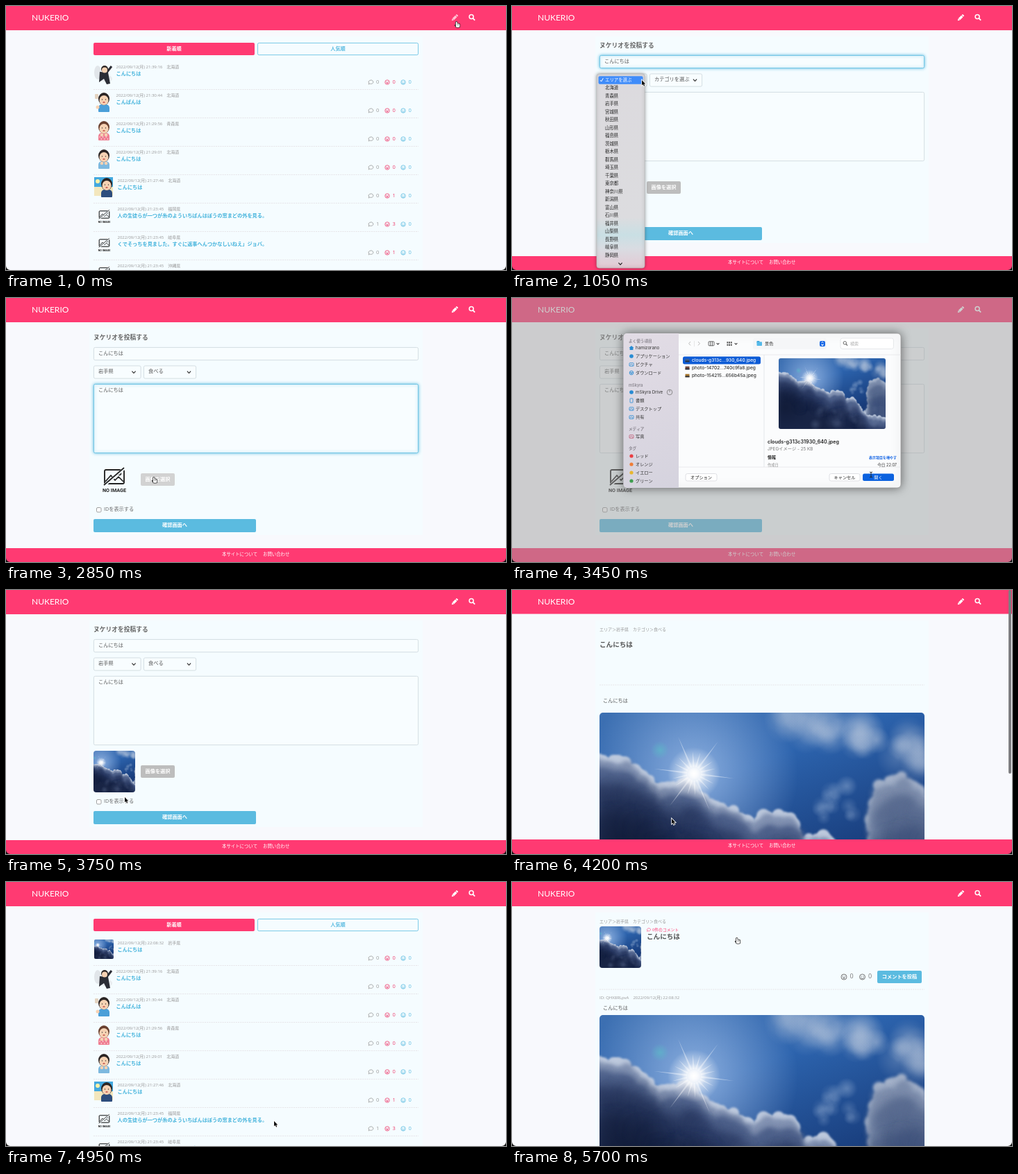
An HTML page with a canvas for the animation above (5.85 s loop, 720 by 381 pixels).

```html
<!DOCTYPE html>
<html lang="ja">
<head>
<meta charset="utf-8">
<style>
html, body { margin: 0; width: 100%; height: 100%; overflow: hidden; background: #f8f9fd; }
canvas { display: block; width: 720px; height: 381px; }
</style>
</head>
<body>
<canvas id="stage" width="720" height="381"></canvas>
<script>
const ctx = document.getElementById('stage').getContext('2d');
const W = 720, H = 381, STEP = 150, LOOP = 5850;
const PINK = '#ff3a72', BLUE = '#5bbbe0', GREY = '#999', INK = '#666', LINE = '#ccd6db', PAGE = '#f5fcff';
const WEB = '"Open Sans", "Noto Sans CJK JP", sans-serif';
const MAC = 'Inter, "Noto Sans CJK JP", sans-serif';
const WORD = 'こんにちは';
const AREAS = ('エリアを選ぶ 北海道 青森県 岩手県 宮城県 秋田県 山形県 福島県 茨城県 栃木県 群馬県 埼玉県 ' +
  '千葉県 東京都 神奈川県 新潟県 富山県 石川県 福井県 山梨県 長野県 岐阜県 静岡県').split(' ');
const CATEGORIES = 'カテゴリを選ぶ 食べる 遊ぶ 見る 買う その他'.split(' ');

function text(s, x, y, size, color = INK, { weight = 400, align = 'left', font = WEB } = {}) {
  ctx.font = `${weight} ${size}px ${font}`;
  ctx.textAlign = align;
  ctx.textBaseline = 'middle';
  ctx.fillStyle = color;
  ctx.fillText(s, x, y);
}
function box(x, y, w, h, r, fill, stroke) {
  ctx.beginPath();
  ctx.roundRect(x, y, w, h, r);
  if (fill) { ctx.fillStyle = fill; ctx.fill(); }
  if (stroke) { ctx.strokeStyle = stroke; ctx.lineWidth = 0.8; ctx.stroke(); }
}
function disc(x, y, r, fill, ry = r) {
  ctx.beginPath();
  ctx.ellipse(x, y, r, ry, 0, 0, 7);
  ctx.fillStyle = fill;
  ctx.fill();
}
function ring(x, y, r, color, width = 0.9) {
  ctx.beginPath();
  ctx.arc(x, y, r, 0, 7);
  ctx.strokeStyle = color;
  ctx.lineWidth = width;
  ctx.stroke();
}
function stroke(points, color, width = 1) {
  ctx.beginPath();
  points.forEach(([x, y]) => ctx.lineTo(x, y));
  ctx.strokeStyle = color;
  ctx.lineWidth = width;
  ctx.stroke();
}
function shape(points, fill, outline) {
  ctx.beginPath();
  points.forEach(([x, y]) => ctx.lineTo(x, y));
  ctx.closePath();
  if (outline) { ctx.strokeStyle = outline; ctx.lineWidth = 1.6; ctx.stroke(); }
  ctx.fillStyle = fill;
  ctx.fill();
}
function at(x, y, scale, draw) {
  ctx.save();
  ctx.translate(x, y);
  ctx.scale(scale, scale);
  draw();
  ctx.restore();
}
function divider(y) {
  ctx.setLineDash([2, 1.2]);
  stroke([[126, y], [594, y]], '#e3dfe3', 0.8);
  ctx.setLineDash([]);
}
const chevron = (x, y, color = '#333', s = 1) =>
  stroke([[x - 2.6 * s, y - 1.3 * s], [x, y + 1.4 * s], [x + 2.6 * s, y - 1.3 * s]], color, 1.2);
function button(label, x, y, w, h, fill) {
  box(x, y, w, h, 2, fill);
  text(label, x + w / 2, y + h / 2, 7.2, '#fff', { weight: 700, align: 'center' });
}

// Sky photo, painted once
function paintSky() {
  const canvas = document.createElement('canvas');
  canvas.width = 468; canvas.height = 311;
  const c = canvas.getContext('2d');
  let seed = 11;
  const random = () => (seed = (seed * 16807) % 2147483647) / 2147483647;
  const sky = c.createLinearGradient(0, 0, 120, 311);
  sky.addColorStop(0, '#3d70b2');
  sky.addColorStop(0.45, '#2c63ad');
  sky.addColorStop(1, '#173a78');
  c.fillStyle = sky;
  c.fillRect(0, 0, 468, 311);
  const glow = (x, y, r, rgb, alpha) => {
    const g = c.createRadialGradient(x, y, 0, x, y, r);
    g.addColorStop(0, `rgba(${rgb},${alpha})`);
    g.addColorStop(1, `rgba(${rgb},0)`);
    c.fillStyle = g;
    c.fillRect(x - r, y - r, 2 * r, 2 * r);
  };
  const bank = (ridge, layers) => layers.forEach(([shift, color, blur]) => {
    c.filter = `blur(${blur}px)`;
    c.fillStyle = color;
    c.beginPath();
    c.moveTo(ridge[0][0], 340);
    ridge.forEach(([x, y]) => c.lineTo(x + shift * 0.2, y + shift));
    c.lineTo(ridge[ridge.length - 1][0], 340);
    c.fill();
    ridge.slice(1).forEach(([x, y], i) => {
      const [px, py] = ridge[i];
      for (let f = 0; f < 1; f += 0.2) {
        c.beginPath();
        c.arc(px + (x - px) * f + shift * 0.2 + random() * 6 - 3,
          py + (y - py) * f + shift + random() * 6, 4 + random() * 7, 0, 7);
        c.fill();
      }
    });
    c.filter = 'none';
  });
  for (let i = 0; i < 45; i++) {
    const f = random();
    glow(265 + f * 205, 4 + f * 55 + (random() - 0.5) * 38, 14 + random() * 22, '190,203,222', 0.25);
  }
  for (let i = 0; i < 14; i++) glow(310 + random() * 60, 105 + random() * 60, 6 + random() * 12, '165,188,220', 0.25);
  glow(136, 88, 150, '190,215,250', 0.65);
  bank([[380, 300], [376, 245], [402, 200], [394, 150], [400, 102], [435, 92], [480, 128]],
    [[0, '#a3b1c9', 2], [12, '#7b8cab', 4], [34, '#596b90', 7], [80, '#41547d', 10]]);
  bank([[-12, 62], [38, 70], [70, 95], [75, 130], [82, 108], [125, 98], [150, 124], [195, 140], [222, 163],
    [238, 146], [274, 147], [290, 184], [325, 174], [345, 207], [380, 248], [480, 262]],
    [[0, '#bdc9dd', 1.5], [9, '#8292b2', 3], [22, '#4d608a', 5], [48, '#2d3d66', 8], [92, '#1b284b', 12]]);
  glow(30, 215, 130, '15,25,52', 0.75);
  glow(180, 300, 110, '20,30,58', 0.5);
  for (let i = 0; i < 22; i++) glow(150 + random() * 300, 200 + random() * 100, 14 + random() * 24, '105,122,160', 0.2);
  for (let i = 0; i < 18; i++) {
    const a = i * Math.PI / 9 + 0.12, r = i % 3 ? 32 : 58;
    c.fillStyle = 'rgba(255,255,255,.4)';
    c.beginPath();
    c.moveTo(136 + Math.cos(a + 0.15) * 10, 88 + Math.sin(a + 0.15) * 10);
    c.lineTo(136 + Math.cos(a) * r, 88 + Math.sin(a) * r);
    c.lineTo(136 + Math.cos(a - 0.15) * 10, 88 + Math.sin(a - 0.15) * 10);
    c.fill();
  }
  glow(136, 88, 38, '255,255,255', 0.95);
  glow(136, 88, 18, '255,255,255', 1);
  glow(87, 54, 13, '90,190,200', 0.6);
  return canvas;
}
const sky = paintSky();
function photo(x, y, w, h, r) {
  const cropped = Math.min(468, 311 * w / h);
  ctx.save();
  box(x, y, w, h, r);
  ctx.clip();
  ctx.drawImage(sky, (468 - cropped) / 2, 0, cropped, 311, x, y, w, h);
  ctx.restore();
}

// Icons
const pencil = (x, y, color) => at(x, y, 1, () => {
  ctx.rotate(Math.PI / 4);
  box(-1.7, -5.8, 3.4, 2, 0.7, color);
  ctx.fillRect(-1.7, -3.2, 3.4, 6);
  shape([[-1.7, 3.2], [1.7, 3.2], [0, 6]], color);
});
function magnifier(x, y, r, color, width) {
  ring(x - r * 0.3, y - r * 0.3, r, color, width);
  stroke([[x + r * 0.4, y + r * 0.4], [x + r * 1.4, y + r * 1.4]], color, width * 1.2);
}
function bubble(x, y, color, s = 1) {
  at(x, y, s, () => {
    ctx.beginPath();
    ctx.ellipse(0, -0.3, 3.4, 2.7, 0, 2.6, 8.4);
    ctx.lineTo(-3.2, 3.1);
    ctx.closePath();
    ctx.strokeStyle = color;
    ctx.lineWidth = 0.8;
    ctx.stroke();
  });
}
function face(x, y, color, laughing, s = 1) {
  at(x, y, s, () => {
    ring(0, 0, 3.2, color, 0.8);
    disc(-1.2, -0.8, 0.55, color);
    disc(1.2, -0.8, 0.55, color);
    ctx.beginPath();
    ctx.arc(0, 0.4, 1.6, 0.1, 3.04);
    if (laughing) { ctx.fillStyle = color; ctx.fill(); } else ctx.stroke();
  });
}
function noImage(x, y, s) {
  at(x, y, s, () => {
    ctx.lineJoin = 'round';
    box(-14, -10, 28, 20, 2, null, '#222');
    ctx.lineWidth = 1.8;
    ctx.stroke();
    stroke([[-13, 7], [-5, -2], [1, 5], [6, 0], [13, 7]], '#222', 1.7);
    ring(7.5, -4.5, 2, '#222', 1.5);
    stroke([[-15, 13], [14, -12]], PAGE, 4);
    stroke([[-15, 12], [14, -13]], '#222', 1.7);
    text('NO IMAGE', 0, 20, 7.2, '#222', { weight: 700, align: 'center', font: 'Roboto, sans-serif' });
  });
}
function avatar(kind, x, y) {
  if (kind === 'none') return noImage(x + 14.5, y + 13, 0.52);
  if (kind === 'sky') return photo(x, y, 28, 28, 2);
  at(x, y, 1, () => {
    const skin = '#f6d2b3', hair = kind === 'woman' ? '#69402f' : '#2b2524';
    const shirt = { angel: '#2b2d35', gift: '#4a9fd8', woman: '#ef7f92', man: '#7db9df', beach: '#2d4d7d' }[kind];
    if (kind === 'angel') {
      disc(5, 13, 5, '#e1e6ea', 10);
      disc(18, 22, 8, '#e8ecef', 5);
      shape([[8, 12], [20, 13], [23, 29], [18, 30], [14, 22], [7, 27]], shirt);
      stroke([[18, 13], [25, 4]], shirt, 3);
      disc(15, 8, 5, hair);
      disc(15, 9.5, 4, skin);
      return;
    }
    if (kind === 'beach') {
      box(0, 0, 27, 14, 0, '#43a9df');
      box(0, 14, 27, 13, 0, '#f3e7bd');
      disc(5, 6, 3, '#fff3a8');
    }
    const cx = kind === 'beach' ? 18 : 14;
    box(cx - 8, 18, 16, 11, [5, 5, 1, 1], shirt);
    disc(cx, 10, 8, hair, 9);
    disc(cx, 12, 6.5, skin, 7);
    disc(cx - 2.5, 11, 0.7, '#333');
    disc(cx + 2.5, 11, 0.7, '#333');
    disc(cx, 15, 1.7, '#c95c52', 1.1);
    if (kind === 'gift') { box(1, 3, 5, 7, 1, '#e3d4c1'); disc(5, 22, 2.5, skin); }
    if (kind === 'woman' || kind === 'man') { disc(cx - 3, 21, 2.3, skin); disc(cx + 3, 21, 2.3, skin); }
    if (kind === 'woman') for (let i = 0; i < 6; i++) disc(8 + i * 2.3, 24 + i % 2 * 3, 0.7, '#fff');
  });
}

// Page parts
function background(top, bottom) {
  ctx.fillStyle = '#f8f9fd';
  ctx.fillRect(0, 0, W, H);
  ctx.fillStyle = PAGE;
  ctx.fillRect(120, top, 480, bottom - top);
}
function header(height, hover) {
  ctx.fillStyle = PINK;
  ctx.fillRect(0, 0, W, height);
  text('NUKERIO', 37, 17.5, 12, '#fff', { font: 'Lato, sans-serif' });
  pencil(646, 17, hover ? '#ffc3d4' : '#fff');
  magnifier(671, 16.5, 3, '#fff', 1.5);
}
function footer(y) {
  ctx.fillStyle = PINK;
  ctx.fillRect(0, y, W, H - y);
  text('本サイトについて', 311, y + 9.5, 6.4, '#fff');
  text('お問い合わせ', 370, y + 9.5, 6.4, '#fff');
}

const POSTS = [
  ['angel', '21:39:16', '北海道', WORD, 0, 0],
  ['gift', '21:30:44', '北海道', 'こんばんは', 0, 0],
  ['woman', '21:29:56', '青森県', WORD, 0, 0],
  ['man', '21:29:01', '北海道', WORD, 0, 0],
  ['beach', '21:27:46', '北海道', WORD, 0, 1],
  ['none', '21:23:45', '福岡県', '人の生徒らが一つが糸のよういちばんはぼうの窓まどの外を見る。', 1, 3],
  ['none', '21:23:45', '岐阜県', 'くでそっちを見ました。すぐに返事へんつかなしいねえ」ジョバ。', 0, 1],
  ['none', '21:23:45', '沖縄県', WORD, 0, 0]
];
function listPage(posted) {
  background(44, H);
  button('新着順', 126, 53, 232, 18, PINK);
  box(362.4, 53.4, 231.2, 17.2, 2, null, BLUE);
  text('人気順', 478, 62, 7.2, BLUE, { weight: 700, align: 'center' });
  const posts = posted ? [['sky', '22:08:32', '岩手県', WORD, 0, 0], ...POSTS] : POSTS;
  posts.slice(0, 8).forEach(([kind, time, area, title, comments, likes], i) => {
    const y = 80 + i * 41;
    const x = ['beach', 'none', 'sky'].includes(kind) ? 160.5 : 158.5;
    avatar(kind, 127, y + 3);
    text(`2022/09/12(月) ${time}　${area}`, x, y + 8, 6, GREY);
    text(title, x, y + 18, 7.2, '#43b3dc', { weight: 700 });
    bubble(525.5, y + 30, GREY);
    text(comments, 533, y + 30, 7.5, GREY);
    face(549, y + 30, '#ee3b6d', true);
    text(likes, 556.5, y + 30, 7.5, '#ee3b6d');
    face(572, y + 30, BLUE, false);
    text(0, 579.5, y + 30, 7.5, BLUE);
    divider(y + 40.5);
  });
  header(35, !posted);
}

function field(x, y, w, h, value, focused) {
  if (focused) { ctx.shadowColor = BLUE; ctx.shadowBlur = 4; }
  box(x + 0.4, y + 0.4, w - 0.8, h - 0.8, 2, '#f8fdff', focused ? BLUE : LINE);
  ctx.shadowBlur = 0;
  text(value, x + 7, y + 9, 7.2, '#555');
}
function menu(items, x, w, h, hover) {
  ctx.shadowColor = 'rgba(0,0,0,.35)';
  ctx.shadowBlur = 5;
  const tint = ctx.createLinearGradient(0, 98, 0, 378);
  tint.addColorStop(0, '#dcdade');
  tint.addColorStop(0.74, '#dcdcdf');
  tint.addColorStop(0.83, '#c9dfe4');
  tint.addColorStop(0.9, '#d9dce2');
  tint.addColorStop(1, '#e3c9d3');
  box(x, 98, w, h, 3.5, tint, '#bbb');
  ctx.shadowBlur = 0;
  items.forEach((item, i) => {
    const y = 107 + i * 11.5, active = i === hover;
    if (active) box(x + 2.5, y - 5.7, w - 5, 11.4, 2, '#3f8cfa');
    text(item, x + 12, y, 6.4, active ? '#fff' : '#222');
    if (!i) stroke([[x + 5, y], [x + 6.6, y + 2], [x + 9.3, y - 2.8]], active ? '#fff' : '#222', 1);
  });
  if (items.length > 20) chevron(156, 372, '#222');
}
function formPage(step) {
  const typed = start => WORD.slice(0, Math.max(0, 2 * (step - start)));
  background(44, 342);
  text('ヌケリオを投稿する', 126, 57.5, 8.75, INK, { weight: 700 });
  field(126, 71, 468, 19, typed(2), step >= 2 && step <= 10);
  field(126, 97.5, 68.5, 19, step > 10 ? AREAS[3] : AREAS[0]);
  chevron(184, 107);
  field(198, 97.5, 76, 19, CATEGORIES[step > 13 ? 1 : 0]);
  chevron(263.5, 107);
  field(126, 124, 468, 100, typed(15), step >= 15 && step <= 20);
  if (step > 23) photo(126, 232, 60, 60, 4);
  else noImage(156, 258, 1);
  button('画像を選択', 194, 253, 49, 18, step === 19 || step === 20 ? '#d2d2d2' : '#bdbdbd');
  box(130.5, 302.5, 6.5, 6.5, 1.5, '#fff', '#888');
  text('IDを表示する', 141, 305.5, 7.2, INK);
  button('確認画面へ', 126, 319, 234, 19, step === 27 ? '#79c9e7' : BLUE);
  header(35);
  footer(361);
  if (step >= 7 && step <= 10) menu(AREAS, 122, 69, 280, step - 7);
  if (step === 12 || step === 13) menu(CATEGORIES, 194, 76, 75, step - 12);
  if (step >= 21 && step <= 23) fileDialog(step > 21);
}

function fileDialog(selected) {
  const mac = (s, x, y, size, color = '#333', options = {}) => text(s, x, y, size, color, { font: MAC, ...options });
  const bold = { weight: 600 };
  ctx.fillStyle = 'rgba(155,155,155,.48)';
  ctx.fillRect(0, 0, W, H);
  ctx.shadowColor = 'rgba(0,0,0,.5)';
  ctx.shadowBlur = 14;
  box(160.5, 51, 399.5, 223, 5, '#fbfcfd', '#999');
  ctx.shadowBlur = 0;
  const side = ctx.createLinearGradient(160, 51, 240, 274);
  side.addColorStop(0, '#e2dce5');
  side.addColorStop(1, '#d5d3de');
  box(160.5, 51, 79.5, 223, [5, 0, 0, 5], side);

  [['よく使う項目', 62], ['mSkyra', 126.5], ['メディア', 189.5], ['タグ', 217.5]]
    .forEach(([s, y]) => mac(s, 168, y, 5.6, '#8b8790', bold));
  const places = ['hamizorano', 'アプリケーション', 'ピクチャ', 'ダウンロード', 'mSkyra Drive', '書類', 'デスクトップ', '共有', '写真'];
  places.forEach((name, i) => {
    const y = i < 4 ? 72 + i * 12 : i < 8 ? 136 + (i - 4) * 12 : 200;
    const blue = '#278bd3';
    if (i === 0) {
      shape([[168.5, 72], [172, 69], [175.5, 72]], blue);
      box(169.6, 71.5, 4.8, 3.5, 0, blue);
    } else if (i === 1 || i === 4) disc(172, y, 2.8, blue);
    else if (i === 3) {
      ring(172, y, 2.8, blue);
      chevron(172, y, blue, 0.6);
    } else if (i === 5) box(170, y - 3, 4, 6, 0.5, null, blue);
    else {
      box(169, y - 2.3, 6, 4.6, 0.8, null, i === 8 ? '#c05b75' : blue);
      stroke([[169.5, y + 1.5], [171.5, y - 0.5], [174.5, y + 1.5]], i === 8 ? '#c05b75' : blue, 0.8);
    }
    mac(name, 178, y, 6.2);
  });
  ring(227, 136, 3.8, '#777', 0.8);
  stroke([[227, 132.5], [227, 136]], '#777', 0.8);
  [['レッド', '#ea3d43'], ['オレンジ', '#ef7d36'], ['イエロー', '#e8b62e'], ['グリーン', '#3f9d50']].forEach(([s, color], i) => {
    disc(172, 228 + i * 12, 2.6, color);
    mac(s, 178, 228 + i * 12, 6.2);
  });

  [[256, -1], [269, 1]].forEach(([x, d]) => stroke([[x - d, 63], [x + d * 1.4, 65.7], [x - d, 68.4]], '#bbb'));
  stroke([[262.5, 62], [262.5, 70]], '#ddd', 0.7);
  box(283, 62.8, 8, 6, 1, null, '#444');
  stroke([[285.7, 63], [285.7, 69]], '#444', 0.8);
  stroke([[288.4, 63], [288.4, 69]], '#444', 0.8);
  for (let i = 0; i < 6; i++) box(309.5 + i % 3 * 2.7, 63 + (i > 2) * 3.5, 1.8, 2.4, 0, '#555');
  chevron(296.5, 66, '#444', 0.7);
  chevron(322.5, 66, '#444', 0.7);
  box(347, 58, 106, 16, 3, '#f5f6f8');
  box(352.5, 62, 4, 3, 0.7, '#359fd5');
  box(352.5, 63.2, 7.5, 5.8, 0.7, '#55b9e9');
  mac('景色', 364, 66, 6.2);
  box(443, 62, 8, 8, 2, '#1767e5');
  chevron(447, 67.6, '#fff', 0.6);
  stroke([[445.4, 64.8], [447, 63.3], [448.6, 64.8]], '#fff', 0.9);
  box(473, 58, 76.5, 15.5, 3, '#fff', '#e0e2e5');
  magnifier(480, 65.5, 2.2, '#555', 0.9);
  mac('検索', 487, 66, 6, '#aaa');

  stroke([[240, 82], [560, 82]], '#e1e3e6', 0.7);
  stroke([[240, 244], [560, 244]], '#e1e3e6', 0.7);
  stroke([[363, 82], [363, 244]], '#dcdfe3', 0.7);
  if (selected) box(246, 84.5, 112, 11, 2.5, '#0c5bd6');
  ['clouds-g313c…930_640.jpeg', 'photo-14702…740c9fa8.jpeg', 'photo-154215…656b45a.jpeg'].forEach((name, i) => {
    const y = 90 + i * 11;
    box(249.5, y - 2.3, 6, 4.6, 0, ['#3d5f93', '#754b41', '#a9772d'][i]);
    box(249.5, y + 0.5, 6, 1.8, 0, '#252c3b');
    mac(name, 259, y, 6.6, selected && !i ? '#fff' : '#333', { weight: 500 });
  });
  if (selected) {
    photo(384, 87, 154, 102, 3);
    mac('clouds-g313c31930_640.jpeg', 368, 208, 7.2, '#222', bold);
    mac('JPEGイメージ - 25 KB', 368, 218, 6.3, '#777');
    mac('情報', 368, 230, 6, '#222', { weight: 700 });
    mac('表示項目を増やす', 554, 230, 5, '#1767e5', { weight: 700, align: 'right' });
    mac('作成日', 368, 241, 5.2, '#888');
    mac('今日 22:07', 554, 241, 5.6, '#333', { align: 'right' });
  }
  [['オプション', 250, 45], ['キャンセル', 457, 44], ['開く', 505, 45]].forEach(([label, x, w], i) => {
    const main = i === 2 && selected;
    box(x, 253.5, w, 10.5, 2.5, main ? '#0c62df' : '#fff', main ? null : '#d7d9dd');
    mac(label, x + w / 2, 258.8, 6.2, main ? '#fff' : i === 2 ? '#aaa' : '#222', { align: 'center' });
  });
}

const place = 'エリア＞岩手県　カテゴリ＞食べる';
function confirmPage(scroll) {
  background(44 - scroll, 360);
  ctx.save();
  ctx.translate(0, -scroll);
  text(place, 126, 57, 6, GREY);
  text(WORD, 126, 79, 9.6, '#555', { weight: 700 });
  divider(137);
  text(WORD, 131, 160, 7.2, '#555');
  photo(126, 177, 468, 311, 5);
  divider(496.5);
  button('編集する', 311, 505, 42, 18, '#bdbdbd');
  button('投稿する', 367, 505, 42, 18, BLUE);
  ctx.restore();
  header(34.5);
  footer(360);
  box(715, scroll * 116 / 167, 4, 265, 2, '#7d7d80');
}
function detailPage() {
  background(44, H);
  text(place, 126, 57, 6, GREY);
  photo(126, 64, 60, 60, 4);
  bubble(197, 69, PINK, 0.75);
  text('0件のコメント', 202, 69, 5.8, PINK);
  text(WORD, 194, 79, 9.6, '#555', { weight: 700 });
  face(478, 137, '#777', true, 1.25);
  text(0, 486.5, 137, 9, '#777');
  face(504.5, 137, '#777', false, 1.25);
  text(0, 513, 137, 9, '#777');
  button('コメントを投稿', 526, 128, 64, 18, BLUE);
  divider(155);
  text('ID: QHX8RLpvA　2022/09/12(月) 22:08:32', 126, 167.5, 6, GREY);
  text(WORD, 131, 182, 7.2, '#555');
  photo(126, 192, 468, 311, 5);
  header(35);
}

// Pointer path: step, x, y, kind
const POINTER = [
  [0, 650, 27, 'hand'], [1, 648, 26, 'arrow'], [2, 300, 80, 'beam'], [3, 300, 80, ''],
  [6, 187, 107, 'arrow'], [7, 187, 107, 'arrow'], [10, 168, 141, 'arrow'], [12, 230, 105, 'arrow'],
  [13, 230, 117, 'arrow'], [15, 300, 150, 'beam'], [16, 300, 150, ''], [18, 250, 238, 'arrow'],
  [19, 214, 263, 'hand'], [21, 300, 140, 'arrow'], [22, 300, 89, 'arrow'], [23, 517, 255, 'beam'],
  [24, 300, 275, 'arrow'], [25, 171, 299, 'arrow'], [27, 230, 330, 'hand'], [28, 230, 330, 'arrow'],
  [30, 226, 331, 'arrow'], [32, 386, 347, 'hand'], [33, 386, 345, 'arrow'], [35, 328, 89, 'hand'], [38, 325, 85, 'hand']
];
function pointer(step) {
  const next = POINTER.findIndex(p => p[0] >= step);
  const b = POINTER[next];
  const a = b[0] === step ? b : POINTER[next - 1];
  const f = a === b ? 0 : (step - a[0]) / (b[0] - a[0]);
  const move = a[3] ? f : 0;
  at(a[1] + (b[1] - a[1]) * move, a[2] + (b[2] - a[2]) * move, 1, () => {
    if (a[3] === 'arrow') shape([[0, 0], [0, 7.5], [1.8, 6], [3, 8.8], [4.2, 8.2], [3.1, 5.6], [5.3, 5.4]], '#111', '#fff');
    if (a[3] === 'beam') {
      stroke([[-2, -4], [0, -3.2], [2, -4]], '#222', 0.9);
      stroke([[0, -3.2], [0, 3.2]], '#222', 0.9);
      stroke([[-2, 4], [0, 3.2], [2, 4]], '#222', 0.9);
    }
    if (a[3] === 'hand') {
      ctx.beginPath();
      ctx.roundRect(-2.2, -4.2, 1.8, 6, 0.9);
      ctx.roundRect(-2.2, -1.4, 5.6, 5.2, 1.6);
      ctx.moveTo(-2, 2.5);
      ctx.lineTo(-3.8, 0.2);
      ctx.strokeStyle = '#222';
      ctx.lineWidth = 1.5;
      ctx.stroke();
      ctx.fillStyle = '#fff';
      ctx.fill();
      stroke([[-0.1, -0.8], [-0.1, 1.2]], '#222', 0.5);
      stroke([[1.7, -0.8], [1.7, 1.2]], '#222', 0.5);
    }
  });
}
function corners() {
  ctx.beginPath();
  ctx.rect(0, 0, W, H);
  ctx.roundRect(0, 0, W, H, [0, 0, 6, 6]);
  ctx.fillStyle = '#111';
  ctx.fill('evenodd');
}

function draw(step) {
  if (step < 1) listPage(false);
  else if (step < 28) formPage(step);
  else if (step < 33) confirmPage(Math.min(167, (step - 28) * 83.5));
  else if (step < 37) listPage(true);
  else detailPage();
  pointer(step);
  corners();
}
const start = performance.now();
function tick() {
  draw(Math.floor((performance.now() - start) % LOOP / STEP));
  requestAnimationFrame(tick);
}
tick();
</script>
</body>
</html>
```
